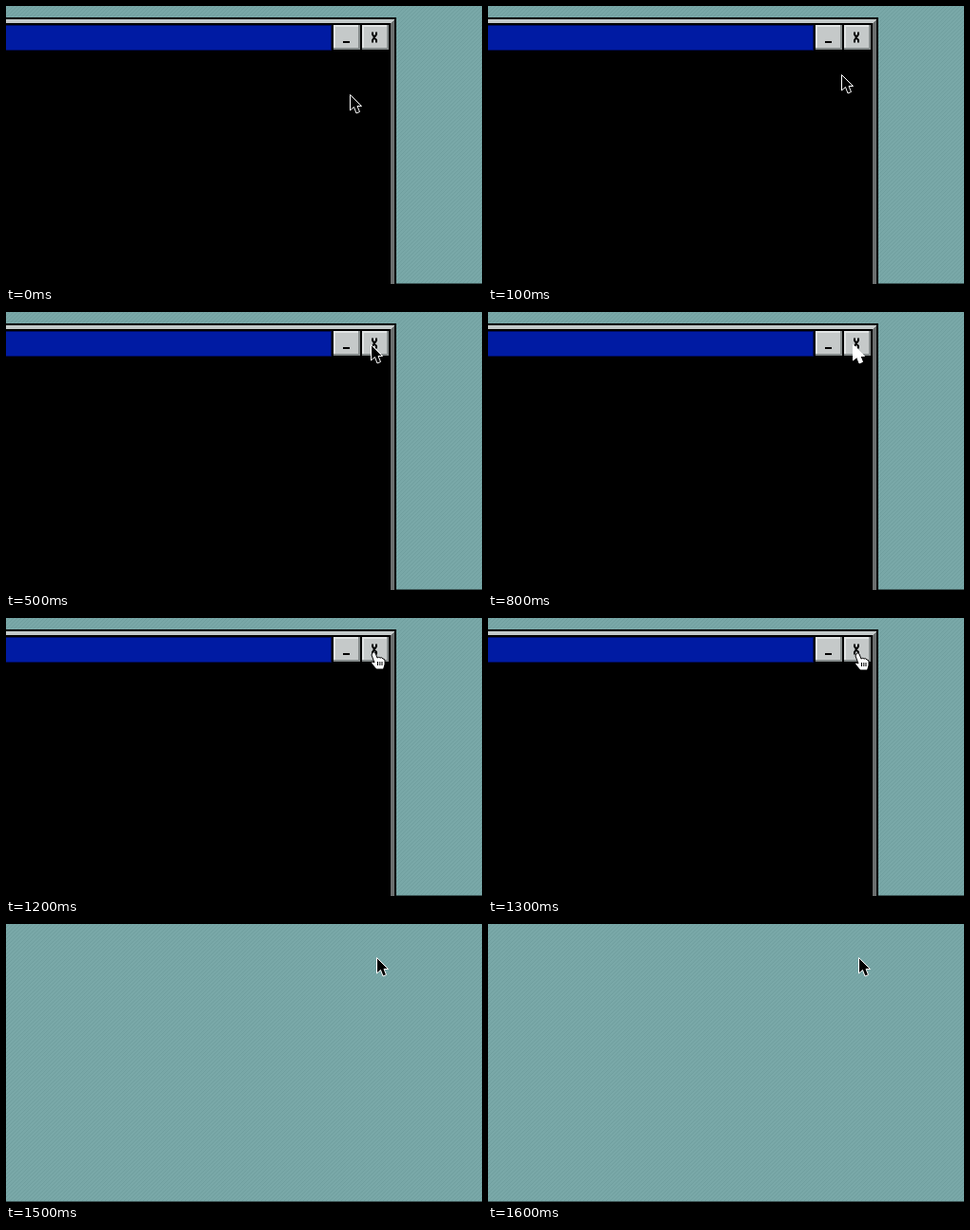
Animation of 500 by 293 pixels, one loop 2 s. Source, as an HTML page:

```html
<!DOCTYPE html>
<html lang="en">
<head>
<meta charset="utf-8">
<title>Closing a window</title>
<style>
  html, body { margin: 0; width: 100%; height: 100%; overflow: hidden; background: #76a5a5; }
  svg { display: block; width: 100%; height: 100%; }
  rect, .bevel { shape-rendering: crispEdges; }
</style>
</head>
<body>
<svg viewBox="0 0 500 293" preserveAspectRatio="none">
  <defs>
    <pattern id="weave" width="4" height="4" patternUnits="userSpaceOnUse">
      <rect width="4" height="4" fill="#79a8a8"/>
      <path d="M-1 1L1 -1M-1 5L5 -1M3 5L5 3" stroke="#709f9f"/>
    </pattern>
    <g id="button">
      <rect width="28" height="26" fill="#858b8b"/>
      <rect width="26" height="24" fill="#e2e5e5"/>
      <rect x="2" y="2" width="24" height="22" fill="#c5c9c9"/>
    </g>
  </defs>

  <rect width="500" height="293" fill="url(#weave)"/>
  <rect y="292" width="500" height="1" fill="#3c5555"/>

  <g id="window">
    <rect y="12" width="410" height="281"/>
    <path class="bevel" d="M0 14H408L404 18H0Z" fill="#c4caca"/>
    <path class="bevel" d="M408 14V293H404V18Z" fill="#6b6f6f"/>
    <rect y="20" width="342" height="27" fill="#000b5c"/>
    <rect y="21" width="341" height="25" fill="#001ba3"/>
    <use href="#button" x="344" y="20"/>
    <rect x="354" y="37" width="7" height="2"/>
    <use href="#button" x="374" y="20"/>
    <g id="pressed">
      <rect x="374" y="20" width="28" height="26" fill="#6c6f6f"/>
      <rect x="376" y="22" width="26" height="24" fill="#8d9090"/>
    </g>
    <path d="M385 27.500V30L389 36V38.500M389 27.500V30L385 36V38.500" fill="none" stroke="#000" stroke-width="2"/>
  </g>

  <path id="arrow" d="M.5 .5V17L4.500 13.500L7 20L10.500 18.500L8 12.500H12.500Z" stroke="#fff"/>
  <g id="hand">
    <path d="M2 1.500Q3.500 0 5 2L7 7Q9 5.500 10 7Q12 6 13 8Q15 8 15 10V14L13.500 19H6L1 13Q0 10.500 2 11L4 12L1 4Z"
          fill="#fff" stroke="#000"/>
    <path d="M7.500 11V15M9.800 11V15M12 11V15" stroke="#000" fill="none"/>
  </g>
</svg>
<script>
  const LOOP = 2000, STEP = 100;
  const el = id => document.getElementById(id);
  const [win, pressed, arrow, hand] = ["window", "pressed", "arrow", "hand"].map(el);
  const show = (node, on) => node.setAttribute("display", on ? "inline" : "none");
  const place = (node, x, y) => node.setAttribute("transform", `translate(${x} ${y})`);

  function draw(now) {
    const time = Math.floor(now % LOOP / STEP) * STEP;
    const closed = time >= 1500;
    const pointing = time >= 1200 && !closed;

    show(win, !closed);
    show(pressed, time >= 1400);
    show(hand, pointing);
    show(arrow, !pointing);

    // The arrow decelerates towards the close button.
    const left = Math.max(0, 1 - time / 500);
    if (closed) place(arrow, 389, 35);
    else place(arrow, Math.round(383 - 22 * left ** 2.6), Math.round(34 + 59 * left ** 1.93));
    arrow.setAttribute("fill", closed || time < 700 ? "#000" : time < 800 ? "#888" : "#fff");

    const push = Math.min(1, Math.max(0, (time - 1200) / 200));
    place(hand, 383 + Math.round(3 * push), 35 + Math.round(2 * push));
    requestAnimationFrame(tick);
  }

  const start = performance.now();
  function tick() { draw(performance.now() - start); }
  tick();
</script>
</body>
</html>
```
